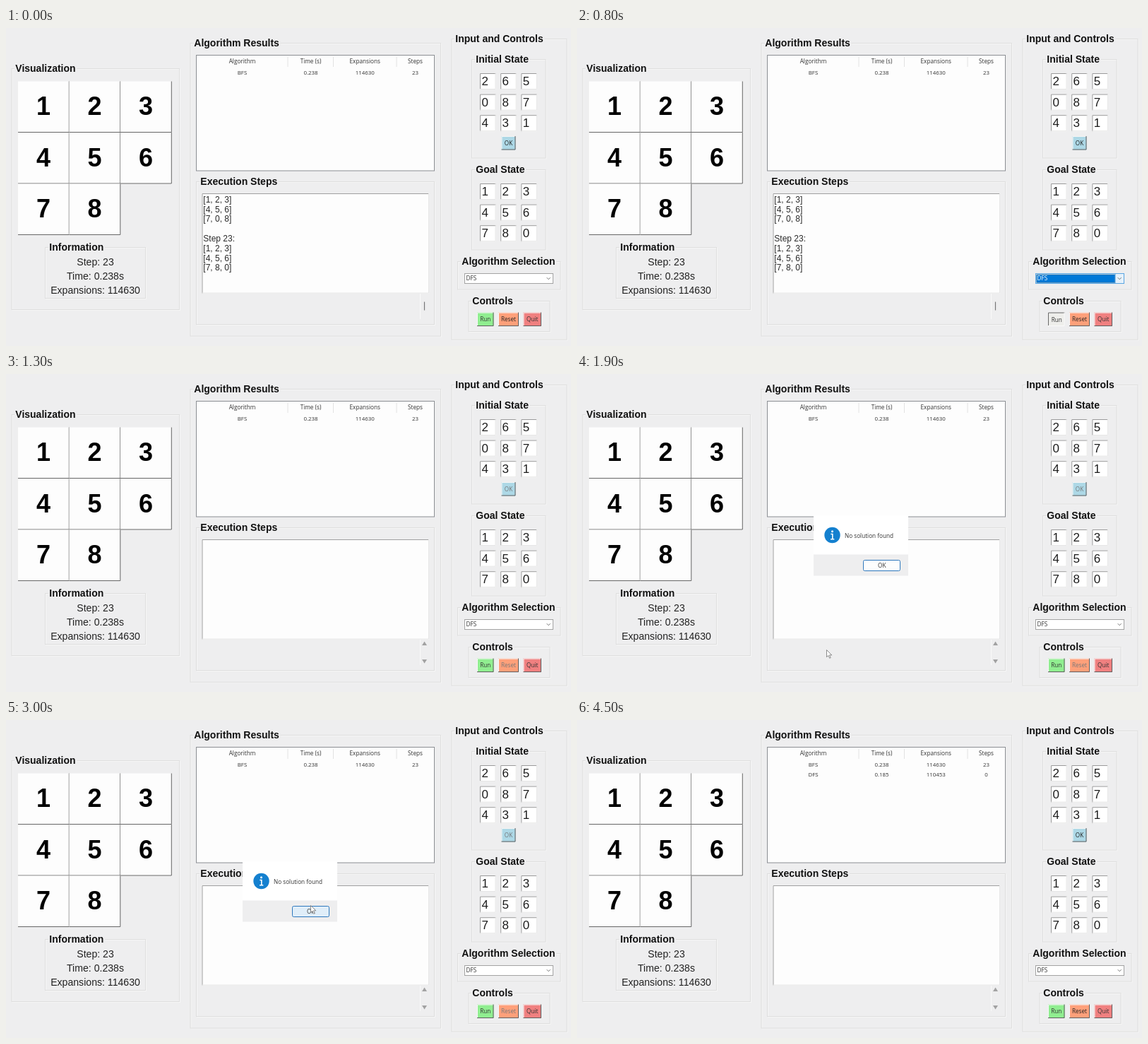
These frames come from a looping animation (800x450 px, 4.6 s). An HTML page:

```html
<!DOCTYPE html>
<html lang="en">
<head>
<meta charset="utf-8">
<title>Puzzle solver</title>
<style>
html, body { margin: 0; width: 100%; height: 100%; overflow: hidden; background: #eeeeef; }
svg { display: block; width: 800px; height: 450px; }
text { font-family: "Liberation Sans", Arial, sans-serif; white-space: pre; }
.title { font-weight: bold; font-size: 14px; fill: #111; }
.info { font-size: 14.1px; fill: #222; }
.tile { font-weight: bold; font-size: 36px; fill: #000; }
.entry { font-size: 17px; fill: #1c1c1c; }
.log { font-size: 12px; fill: #2a2a2a; }
.ui { font-family: "Open Sans", "Noto Sans", sans-serif; font-size: 8.2px; fill: #333; }
.cell { font-size: 7.9px; }
</style>
</head>
<body>
<svg id="stage" viewBox="0 0 800 450"></svg>
<script>
const LOOP = 4600;
const BG = '#eeeeef';
const BLUE = '#0078d7';
const stage = document.getElementById('stage');

function add(parent, tag, attrs, content) {
  const node = document.createElementNS('http://www.w3.org/2000/svg', tag);
  for (const key in attrs) node.setAttribute(key, attrs[key]);
  if (content !== undefined) node.textContent = content;
  parent.appendChild(node);
  return node;
}
const group = (parent = stage) => add(parent, 'g', {});
const rect = (parent, x, y, x2, y2, fill, stroke = 'none', rx = 0) =>
  add(parent, 'rect', { x, y, width: x2 - x, height: y2 - y, fill, stroke, rx });
const path = (parent, d, stroke, width = 1, fill = 'none') =>
  add(parent, 'path', { d, stroke, 'stroke-width': width, fill });
const label = (parent, cls, x, y, content, anchor = 'start') =>
  add(parent, 'text', { class: cls, x, y, 'text-anchor': anchor }, content);

function frame(title, x, y, x2, y2, titleX) {
  rect(stage, x + 1, y + 1, x2 + 1, y2 + 1, 'none', '#f6f6f6');
  rect(stage, x, y, x2, y2, 'none', '#dedede');
  const text = label(stage, 'title', titleX + .3, y + 4.5, title);
  const gap = rect(stage, titleX - 1, y - 4, titleX + text.getComputedTextLength() + 2, y + 4, BG);
  stage.insertBefore(gap, text);
}

// A box with separate top-left and bottom-right edge colours.
function bevel(parent, x, y, x2, y2, fill, lit, shade) {
  const box = rect(parent, x, y, x2, y2, fill);
  const topLeft = path(parent, `M${x + .5} ${y2}V${y + .5}H${x2}`, lit);
  const bottomRight = path(parent, `M${x} ${y2 - .5}H${x2 - .5}V${y}`, shade);
  return { box, topLeft, bottomRight };
}

function button(name, x, y, x2, y2, color) {
  const parts = bevel(stage, x, y, x2, y2, color, '#f6f6f6', '#5f5f5f');
  const text = label(stage, 'ui', (x + x2) / 2, (y + y2) / 2 + 3, name, 'middle');
  return {
    enable(on) { text.style.fill = on ? '#222' : '#75777a'; },
    press(down) {
      parts.box.setAttribute('fill', down ? '#eeeeeb' : color);
      parts.topLeft.setAttribute('stroke', down ? '#696969' : '#f6f6f6');
      parts.bottomRight.setAttribute('stroke', down ? '#fafafa' : '#5f5f5f');
      text.setAttribute('transform', down ? 'translate(.6 .6)' : '');
    }
  };
}

function entries(digits, top) {
  [...digits].forEach((digit, i) => {
    const x = 671 + (i % 3) * 29.2, y = top + Math.floor(i / 3) * 29.6;
    bevel(stage, x, y, x + 22.5, y + 23, '#fff', '#9a9a9a', '#e6e6e6');
    label(stage, 'entry', x + 2.4, y + 17, digit);
  });
}

function tableRow(cells, y, cls = 'ui cell') {
  const row = group();
  [334.5, 431.5, 508.2, 579.5].forEach((x, i) => label(row, cls, x, y, cells[i], 'middle'));
  return row;
}

function arrow() {
  return path(stage, 'M.5 .5V10.5L2.9 8.4L4.7 12.2L6.2 11.5L4.5 7.8H7.8Z', '#707070', .8, '#fff');
}

const show = (node, on) => { node.style.display = on ? '' : 'none'; };
const place = (node, x, y) => node.setAttribute('transform', `translate(${x} ${y})`);

// Puzzle board
frame('Visualization', 8, 57.5, 245.5, 398.5, 13);
for (let i = 0; i < 8; i++) {
  const x = 17 + (i % 3) * 72.5, y = 75.5 + Math.floor(i / 3) * 72.5;
  rect(stage, x, y, x + 72.5, y + 72.5, '#fdfdfd');
  path(stage, `M${x} ${y + 72}H${x + 72.3}V${y}`, '#555', .9);
  label(stage, 'tile', x + 35.9, y + 47.8, i + 1, 'middle');
}
frame('Information', 55.5, 310.5, 197.5, 382.5, 61);
['Step: 23', 'Time: 0.238s', 'Expansions: 114630'].forEach((line, i) =>
  label(stage, 'info', 126.5, 335.9 + i * 20.2, line, 'middle'));

// Results
frame('Algorithm Results', 261, 21.5, 615.5, 436, 266);
rect(stage, 269.5, 38.5, 606.5, 202, '#fdfdfd', '#8b8e93');
for (const x of [399, 463.5, 553]) path(stage, `M${x} 41V55`, '#e2e2e2');
tableRow(['Algorithm', 'Time (s)', 'Expansions', 'Steps'], 50, 'ui');
tableRow(['BFS', '0.238', '114630', '23'], 66);
const newRow = tableRow(['DFS', '0.185', '110453', '0'], 80.3);

frame('Execution Steps', 269.5, 217.5, 606.5, 419.5, 275);
bevel(stage, 277.5, 234, 599, 375.5, '#fdfdfd', '#a0a0a0', '#e6e6e6');
const log = group();
['[1, 2, 3]', '[4, 5, 6]', '[7, 0, 8]', '', 'Step 23:', '[1, 2, 3]', '[4, 5, 6]', '[7, 8, 0]']
  .forEach((line, i) => label(log, 'log', 279.3, 246.7 + i * 13.8, line));
path(stage, 'M586.5 376V412', '#f9f9f9');
const thumb = path(stage, 'M592.5 387.5V399.5', '#777', 1.2);
const scrollArrows = path(stage, 'M589 384L592.5 378.5L596 384ZM589 404L592.5 409.5L596 404Z', 'none', 0, '#a2a2a2');

// Inputs
frame('Input and Controls', 631, 15.5, 794, 441, 636);
frame('Initial State', 659.5, 44.5, 764, 184, 665);
entries('265087431', 64);
const okButton = button('OK', 701.5, 153, 721.5, 172.5, '#add8e6');
frame('Goal State', 659.5, 200.5, 764, 314, 665);
entries('123456780', 220);

frame('Algorithm Selection', 639.5, 330.5, 785, 370, 645);
const combo = rect(stage, 649.5, 347.5, 774.5, 361.5, '#fff', '#a3a3a3');
const selection = group();
rect(selection, 650.5, 348.7, 762, 360.6, BLUE);
add(selection, 'rect', { x: 651, y: 349.2, width: 110.5, height: 10.9, fill: 'none',
  stroke: '#6b6250', 'stroke-width': .6, 'stroke-dasharray': '1 1' });
rect(selection, 762, 347.5, 774.5, 361.5, '#e5f1fb', '#5aa6e2');
path(stage, 'M765.7 353.2L768.2 355.7L770.7 353.2', '#666', .9);
const comboText = label(stage, 'ui', 651.5, 357.3, 'DFS');

frame('Controls', 655, 386.5, 770, 429.5, 660);
const runButton = button('Run', 667, 402.5, 690.5, 422, '#90ee90');
const resetButton = button('Reset', 697, 402.5, 726, 422, '#ffa07a');
button('Quit', 732.5, 402.5, 758, 422, '#f08080');

// Message box
const dialog = group();
rect(dialog, 335, 200, 469, 255.5, '#fff');
rect(dialog, 335, 255.5, 469, 285.5, '#eeeeef');
add(dialog, 'circle', { cx: 361.5, cy: 228, r: 11.2, fill: '#1480cf' });
add(dialog, 'circle', { cx: 361.5, cy: 222.7, r: 1.5, fill: '#fff' });
path(dialog, 'M359.3 226.5H361.8V233.6M359 233.8H364.3', '#fff', 1.6);
label(dialog, 'ui', 379, 231.5, 'No solution found');
const dialogButton = rect(dialog, 405.5, 263.5, 457.5, 278.5, '#fdfdfd', '#2f78bd', 2);
label(dialog, 'ui', 431.8, 274, 'OK', 'middle');

const trail = arrow();
place(trail, 327, 364);
const pointer = arrow();
const beam = path(stage, 'M324.5 366.8H326.5L327.3 367.5L328.1 366.8H330.2M327.3 367.5V377M324.5 377.8H326.5L327.3 377L328.1 377.8H330.2', '#555', .9);

const pointerStops = [[1700, 353, 390], [1900, 353, 390], [2050, 327, 364], [2250, 327, 364], [2400, 431, 262]];

function pointerAt(t) {
  const next = pointerStops.findIndex(stop => stop[0] > t);
  if (next < 0) return pointerStops[pointerStops.length - 1].slice(1);
  const [t0, x0, y0] = pointerStops[Math.max(0, next - 1)];
  const [t1, x1, y1] = pointerStops[next];
  const k = t1 > t0 ? Math.max(0, (t - t0) / (t1 - t0)) : 0;
  const ease = k * k * (3 - 2 * k);
  return [x0 + (x1 - x0) * ease, y0 + (y1 - y0) * ease];
}

function render(t) {
  const within = (from, to) => t >= from && t < to;
  const solving = within(1100, 3100);
  const selected = within(300, 1100) || within(3100, 4200);

  show(log, t < 1100);
  show(thumb, t < 1100);
  show(scrollArrows, t >= 1100);
  show(newRow, t >= 3100);
  okButton.enable(!solving);
  resetButton.enable(!solving);
  runButton.press(within(500, 1100));

  show(selection, selected);
  combo.setAttribute('stroke', selected ? '#5aa6e2' : '#a3a3a3');
  comboText.style.fill = selected ? '#fff' : '#333';

  show(dialog, within(1600, 3100));
  dialogButton.setAttribute('fill', within(2370, 3100) ? '#e0eef9' : '#fdfdfd');
  show(pointer, within(1700, 3100));
  place(pointer, ...pointerAt(t));
  show(trail, within(2300, 2500));
  show(beam, within(3100, 3700));
}

const start = performance.now();
function tick() {
  render((performance.now() - start) % LOOP);
  requestAnimationFrame(tick);
}
tick();
</script>
</body>
</html>
```
